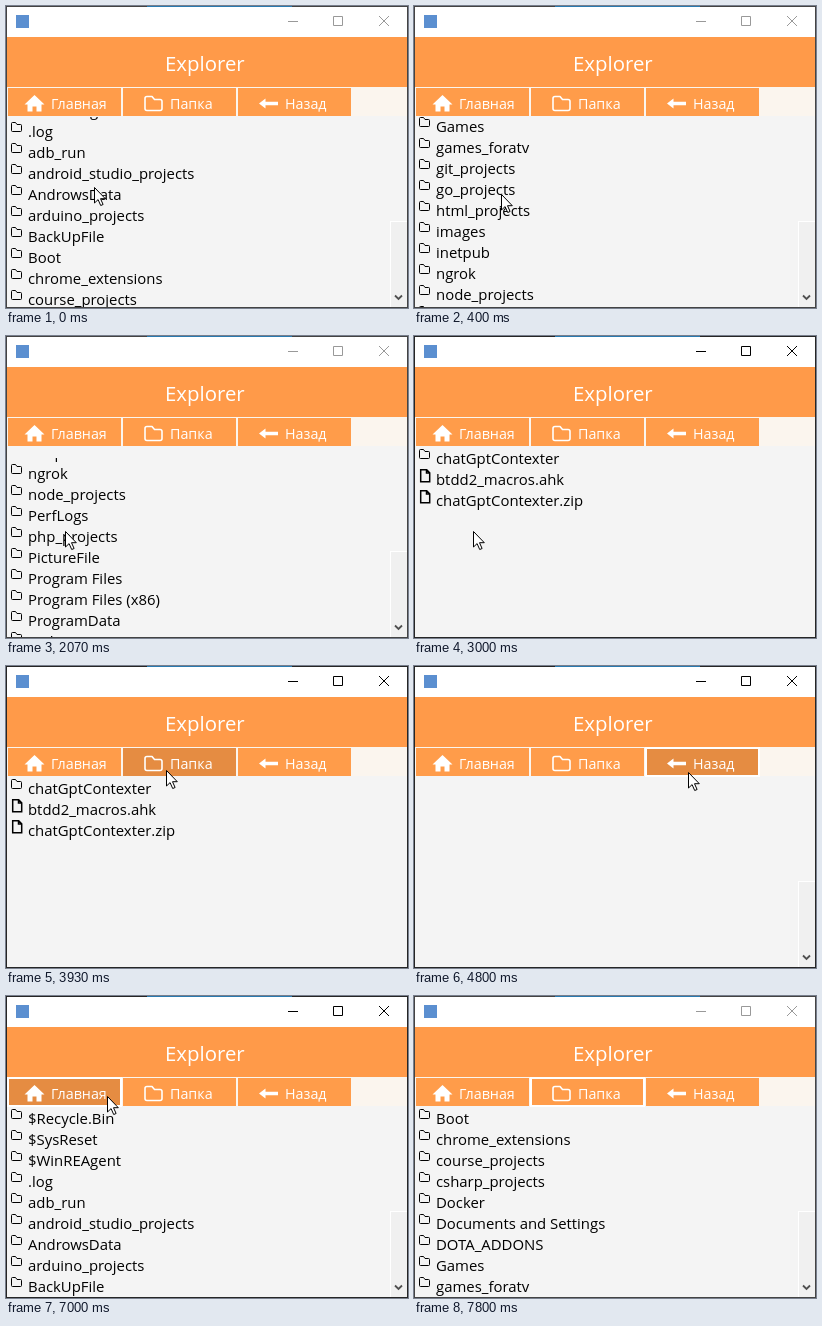
Animation of 402x302 px, one loop 8000 ms. Source, as an HTML page:

```html
<!DOCTYPE html>
<html lang="ru">
<head>
<meta charset="utf-8">
<title>Explorer</title>
<style>
html, body { margin: 0; width: 100%; height: 100%; overflow: hidden; background: #f4f4f4; }
svg { display: block; width: 402px; height: 302px; }
text { font-family: "Open Sans", "Noto Sans", sans-serif; }
.row text { font-size: 14.9px; }
.line { fill: none; stroke: #000; }
.button text { font-size: 14.3px; fill: #fff; }
.button rect { fill: #ff9c4a; }
.button.hover rect { fill: #e58c42; }
.button.focus rect { stroke: #fff; stroke-width: 2; }
.icon { fill: none; stroke: #fff; stroke-width: 1.6; stroke-linejoin: round; }
.solid { fill: #fff; }
</style>
</head>
<body>
<svg viewBox="0 0 402 302">
  <defs>
    <clipPath id="pane"><rect id="paneBox" x="1" width="400" height="190"/></clipPath>
    <path id="folder" class="line" d="M5.5 3v6.500q0 1 1 1h8q1 0 1-1v-5q0-1-1-1h-3.500l-1.500-2h-3q-1 0-1 1z"/>
    <path id="file" class="line" stroke-width="1.5" d="M6.700.7h6l3 3v9h-9zM12.500.7v3.200h3.200"/>
  </defs>
  <rect width="402" height="302" fill="#f4f4f4"/>

  <g clip-path="url(#pane)">
    <g id="drive"></g>
    <g id="inner"></g>
  </g>
  <g id="scrollbar">
    <rect x="384.500" y="215.500" width="17" height="87" fill="#f0f0f0" stroke="#fff"/>
    <path d="M384 216.500h17" stroke="#a8a8a8" id="thumbEdge"/>
    <path class="line" stroke-width="1.800" style="stroke:#505050" d="M389 289.500l3.500 3.500 3.500-3.500"/>
  </g>

  <rect width="402" height="31" fill="#fff"/>
  <rect x="10" y="9" width="13" height="13" fill="#5b8fd0"/>
  <path id="controls" class="line" d="M282 15.500h10M327.500 10.500h9v9h-9zM373 10l10 10M383 10l-10 10"/>
  <rect y="31" width="402" height="50" fill="#ff9a49"/>
  <text x="159" y="65" font-size="20.4" fill="#fff">Explorer</text>
  <rect y="81" width="402" height="29" fill="#fbf5ee"/>
  <g id="toolbar"></g>

  <rect x=".5" y=".5" width="401" height="301" class="line" id="border"/>
  <path d="M141 .5h145" stroke="#2a7ab0"/>
  <path id="cursor" fill="#fff" stroke="#000" stroke-linejoin="round" d="M.5.5v15.500l3.600-3.400 2.600 5.900 2.400-1-2.600-5.800h4.800z"/>
</svg>
<script>
const LOOP = 8000, STEP = 200 / 3, ROW = 21, RELOAD = 130;
const HOME = 0, FOLDER = 1, BACK = 2;
const $ = id => document.getElementById(id);

const driveNames = `$Recycle.Bin|$SysReset|$WinREAgent|.log|adb_run|android_studio_projects|AndrowsData
|arduino_projects|BackUpFile|Boot|chrome_extensions|course_projects|csharp_projects|Docker
|Documents and Settings|DOTA_ADDONS|Games|games_foratv|git_projects|go_projects|html_projects
|images|inetpub|ngrok|node_projects|PerfLogs|php_projects|PictureFile|Program Files
|Program Files (x86)|ProgramData|Python310|Python35|Python36|Python38|python39-64`.replace(/\n/g, "").split("|");
const innerNames = ["chatGptContexter", "btdd2_macros.ahk", "chatGptContexter.zip"];

const rows = (names, isFile) => names.map((name, i) =>
  `<g class="row" transform="translate(0 ${112 + i * ROW})">
    <use href="#${isFile(name) ? "file" : "folder"}"/><text x="22" y="16">${name}</text></g>`).join("");
$("drive").innerHTML = rows(driveNames, () => false);
$("inner").innerHTML = rows(innerNames, name => name.includes("."));

const buttonLeft = i => 2 + 115 * i;
const labels = [
  ["Главная", 43, '<path class="solid" d="M26.5 7l10 9.500h-3v7h-5v-5h-4v5h-5v-7h-3z"/>'],
  ["Папка", 47, '<path class="icon" d="M22 10.500v10q0 2 2 2h13q2 0 2-2v-7q0-2-2-2h-5.500l-2.500-3h-5q-2 0-2 2z"/>'],
  ["Назад", 47, '<path class="solid" d="M21 15.500l6.500-5v3.200h12.500v3.600h-12.500v3.200z"/>']
];
$("toolbar").innerHTML = labels.map(([label, x, icon], i) =>
  `<g class="button" transform="translate(${buttonLeft(i)} 82)">
    <rect width="113" height="28"/>${icon}<text x="${x}" y="21">${label}</text></g>`).join("");
const buttons = [...$("toolbar").children];

// The pointer rests between moves
const moves = [
  { end: 730, time: 730, x: 87, y: 193 },
  { end: 1270, time: 200, x: 48, y: 205 },
  { end: 1530, time: 260, x: 60, y: 213 },
  { end: 1730, time: 130, x: 60, y: 199 },
  { end: 2070, time: 270, x: 59, y: 195 },
  { end: 3600, time: 330, x: 85, y: 108 },
  { end: 3930, time: 330, x: 160, y: 104 },
  { end: 4400, time: 270, x: 274, y: 106 },
  { end: 6330, time: 860, x: 35, y: 99 },
  { end: 7330, time: 730, x: 150, y: 100 }
];
// Each click empties the list, which reloads shortly after
const clicks = [
  { at: -RELOAD, opens: "drive" },
  { at: 2870, opens: "inner" },
  { at: 4800, opens: "drive", button: BACK },
  { at: 6330, opens: "drive", button: HOME },
  { at: 7330, opens: "drive", button: FOLDER }
];

const ramp = (t, a, b) => Math.min(1, Math.max(0, (t - a) / (b - a)));
const ease = p => p * p * (3 - 2 * p);

function pointerAt(t) {
  let x = 88, y = 181;
  for (const m of moves) {
    const p = ease(ramp(t, m.end - m.time, m.end));
    x += (m.x - x) * p;
    y += (m.y - y) * p;
  }
  return [Math.round(x), Math.round(y)];
}

function scrollAt(t) {
  if (t >= 4800) return Math.round(9 * ROW * ramp(t, 7670, 7800));
  return Math.round(60 + 507 * ramp(t, 0, 730) - 147 * ramp(t, 1800, 2200));
}

const show = (id, on) => { $(id).style.display = on ? "" : "none"; };

function draw(now) {
  const tick = Math.floor((now % LOOP + 5) / STEP);
  const t = Math.round(tick * STEP / 10) * 10 % LOOP;
  const [x, y] = pointerAt(t);
  const click = clicks.filter(c => c.at <= t).pop();
  const loaded = t >= click.at + RELOAD;
  const active = t >= 2530 && t < 7670, pointing = t < 7670;
  const scrollingUp = t >= 1870 && t < 2200;

  for (const id of ["drive", "inner"]) show(id, loaded && click.opens === id);
  show("scrollbar", click.opens === "drive");
  show("thumbEdge", t >= 730 && t < 1870);
  show("cursor", pointing);
  $("drive").setAttribute("transform", `translate(0 ${-scrollAt(t)})`);
  $("paneBox").setAttribute("y", scrollingUp ? 122 : 111);
  $("controls").style.stroke = active ? "#000" : "#999";
  $("border").style.stroke = active ? "#262626" : "#444";
  $("cursor").setAttribute("transform", `translate(${x} ${y})`);
  buttons.forEach((el, i) => {
    const dx = x - buttonLeft(i);
    el.classList.toggle("hover", pointing && y >= 82 && y < 110 && dx >= 0 && dx < 113);
    el.classList.toggle("focus", click.button === i);
  });
}

const start = performance.now();
function frame() {
  draw(performance.now() - start);
  requestAnimationFrame(frame);
}
draw(0);
requestAnimationFrame(frame);
</script>
</body>
</html>
```
